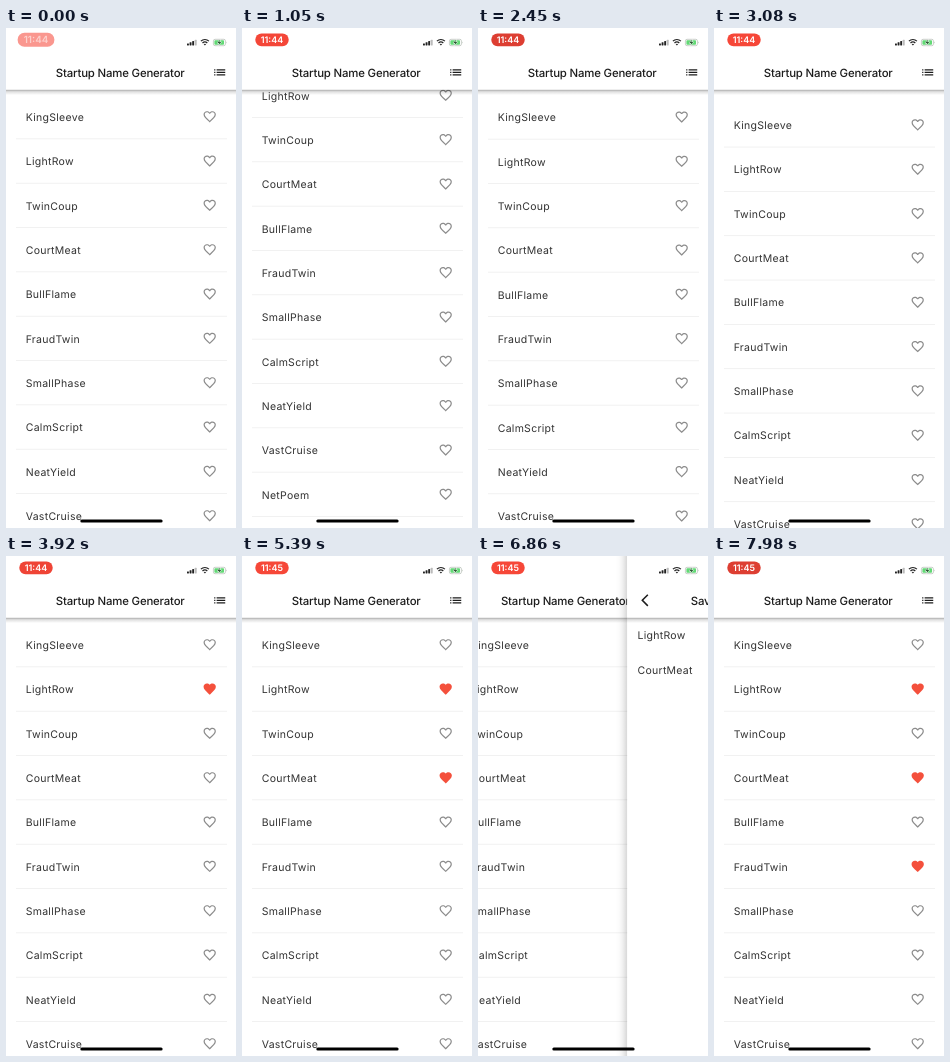
Write an HTML page that moves like this. It is 230 px wide and 500 px high and loops after 8 s.

```html
<!DOCTYPE html>
<html lang="en">
<head>
<meta charset="utf-8">
<title>Startup Name Generator</title>
<style>
  html, body { margin: 0; width: 100%; height: 100%; overflow: hidden; background: #fff; }
  svg { display: block; width: 230px; height: 500px; font-family: Inter, "Liberation Sans", sans-serif; }
  text { text-rendering: geometricPrecision; }
  .row { font-size: 10.5px; letter-spacing: .28px; fill: #333; }
  .title { font-size: 11.4px; font-weight: 500; letter-spacing: -.18px; fill: #1c1c1c; text-anchor: middle; }
  .clock { font-size: 9px; font-weight: 600; fill: #fff; text-anchor: middle; }
</style>
</head>
<body>
<svg id="stage" viewBox="0 0 230 500">
  <defs>
    <linearGradient id="barShadow" x2="0" y2="1">
      <stop offset="0" stop-opacity=".36"/>
      <stop offset=".4" stop-opacity=".12"/>
      <stop offset="1" stop-opacity="0"/>
    </linearGradient>
    <linearGradient id="edgeShadow">
      <stop offset="0" stop-opacity="0"/>
      <stop offset=".3" stop-opacity=".016"/>
      <stop offset=".6" stop-opacity=".06"/>
      <stop offset="1" stop-opacity=".16"/>
    </linearGradient>
  </defs>
  <g id="home">
    <rect width="230" height="500" fill="#fff"/>
    <rect id="press" x="10" width="211" height="34.5"/>
    <g id="list"></g>
  </g>
  <g id="saved">
    <rect x="-11.5" width="11.5" height="500" fill="url(#edgeShadow)"/>
    <rect width="230" height="500" fill="#fff"/>
  </g>
  <g id="status">
    <g id="pill">
      <rect id="pillShape" x="13.3" y="5.4" width="33.4" height="12.8" rx="6.2"/>
      <text id="clock" class="clock" x="30" y="15"></text>
    </g>
    <g id="signal"></g>
    <g fill="none" stroke="#222" stroke-width="1.2">
      <path d="M194.9 13.2a5.6 5.6 0 0 1 8 0M196.5 15a3.4 3.4 0 0 1 4.8 0"/>
      <path d="M198.9 17.6l-1.2-1.4a1.8 1.8 0 0 1 2.4 0z" fill="#222" stroke="none"/>
    </g>
    <rect x="207.4" y="11.3" width="12" height="6.4" rx="1.6" fill="none" stroke="#b4bcb4" stroke-width=".7"/>
    <rect x="208.4" y="12.3" width="9.6" height="4.4" rx=".8" fill="#62d975"/>
    <path d="M220.2 13.5q1.2 1 0 2z" fill="#b4bcb4"/>
    <path d="M214.2 11.6l-3 3.3h1.9l-.8 2.6 3-3.5h-1.9z" fill="#2c5a34" stroke="#fff" stroke-width="1" paint-order="stroke"/>
  </g>
  <rect x="74.3" y="491.4" width="82.3" height="3" rx="1.5"/>
</svg>
<script>
const LOOP = 8000, STEP = 70;
const DP = 500 / 812;          // pixels per layout unit
const PITCH = 72 * DP, FIRST = 144 * DP;
const WIDTH = 230, BAR_BOTTOM = 100 * DP;

const names = ['KingSleeve', 'LightRow', 'TwinCoup', 'CourtMeat', 'BullFlame', 'FraudTwin',
  'SmallPhase', 'CalmScript', 'NeatYield', 'VastCruise', 'NetPoem', 'FastNorm', 'OldGhost'];
const likedAt = { LightRow: 3850, CourtMeat: 4410, FraudTwin: 7700 };

const HEART = 'M12 21.35l-1.45-1.32C5.4 15.36 2 12.28 2 8.5 2 5.42 4.42 3 7.5 3c1.74 0 3.41.81 4.5 2.09' +
  'C13.09 3.81 14.76 3 16.5 3 19.58 3 22 5.42 22 8.5c0 3.78-3.4 6.86-8.55 11.54z';
const HEART_HOLE = 'M12.1 18.55l-.1.1-.1-.1C7.14 14.24 4 11.39 4 8.5 4 6.5 5.5 5 7.5 5c1.54 0 3.04.99 3.57 2.36' +
  'h1.87C13.46 5.99 14.96 5 16.5 5c2 0 3.5 1.5 3.5 3.5 0 2.89-3.14 5.74-7.9 10.05z';
const LIST = 'M3 7h2v2H3zM3 11h2v2H3zM3 15h2v2H3zM7 7h14v2H7zM7 11h14v2H7zM7 15h14v2H7z';
const BACK = 'M17.51 3.87L15.73 2.1 5.84 12l9.9 9.9 1.77-1.77L9.38 12z';

const $ = id => document.getElementById(id);

function add(parent, tag, attrs, text) {
  const node = document.createElementNS('http://www.w3.org/2000/svg', tag);
  for (const key in attrs) node.setAttribute(key, attrs[key]);
  if (text) node.textContent = text;
  parent.append(node);
  return node;
}

// Places a 24-unit icon around a centre point.
function addIcon(parent, d, cx, cy, fill) {
  return add(parent, 'path', {
    d, fill, 'fill-rule': 'evenodd',
    transform: `translate(${cx - 12 * DP} ${cy - 12 * DP}) scale(${DP})`
  });
}

function addBar(page, title, icon, iconX) {
  add(page, 'rect', { y: BAR_BOTTOM, width: WIDTH, height: 5.5, fill: 'url(#barShadow)' });
  add(page, 'rect', { width: WIDTH, height: BAR_BOTTOM, fill: '#fff' });
  add(page, 'text', { class: 'title', x: 114.2, y: 48.6 }, title);
  addIcon(page, icon, iconX, 72 * DP, '#1c1c1c');
}

const hearts = names.map((name, i) => {
  const y = FIRST + i * PITCH;
  add($('list'), 'text', { class: 'row', x: 19.7, y: y + 4.2 }, name);
  add($('list'), 'rect', { x: 10, y: y + PITCH / 2 - .35, width: 211, height: .7, fill: '#ebebeb' });
  return addIcon($('list'), HEART + HEART_HOLE, 203.7, y, '#8c8c8c');
});
addBar($('home'), 'Startup Name Generator', LIST, 213.7);

['LightRow', 'CourtMeat'].forEach((name, i) =>
  add($('saved'), 'text', { class: 'row', x: 10.2, y: (128 + 56 * i) * DP + 4.2 }, name));
addBar($('saved'), 'Saved Suggestions', BACK, 17.7);

for (let i = 0; i < 4; i++) {
  const h = 2 + i * 1.2;
  add($('signal'), 'rect', {
    x: 181 + i * 2.6, y: 17.4 - h, width: 1.9, height: h, rx: .4, fill: i < 3 ? '#222' : '#bbb'
  });
}

const clamp = x => Math.min(1, Math.max(0, x));

// Cubic ease (.4, 0, .2, 1), solved by bisection.
function ease(x) {
  let lo = 0, hi = 1;
  for (let i = 0; i < 24; i++) {
    const s = (lo + hi) / 2, r = 1 - s;
    if (1.2 * s * r * r + .6 * s * s * r + s * s * s < x) lo = s; else hi = s;
  }
  return lo * lo * (3 - 2 * lo);
}

const progress = (t, start, length) => {
  const x = clamp((t - start) / length);
  return x === 0 || x === 1 ? x : ease(x);
};

// Time, list offset, velocity.
const scrollKnots = [
  [770, 0, 0], [1100, -80, -.26], [1610, -129, 0], [1920, -82, .26],
  [2450, .3, .1], [2700, 16, 0], [3080, 8.2, -.03], [3710, 0, 0]
];

function scrollAt(t) {
  const i = scrollKnots.findIndex(k => k[0] > t);
  if (i < 1) return 0;
  const [t0, y0, v0] = scrollKnots[i - 1], [t1, y1, v1] = scrollKnots[i];
  const d = t1 - t0, s = (t - t0) / d, r = 1 - s;
  return y0 * (1 + 2 * s) * r * r + v0 * d * s * r * r + y1 * s * s * (3 - 2 * s) - v1 * d * s * s * r;
}

function drawPill(t) {
  const intro = clamp(t / 700);
  const scale = 1.1 - .1 * intro;
  const dim = Math.max(0, Math.cos((t - 2450) / 1843 * 2 * Math.PI)) * (t > 700 ? 1 : 0);
  $('pill').setAttribute('transform', `translate(30 11.7) scale(${scale}) translate(-30 -11.7)`);
  $('pillShape').setAttribute('fill', `rgb(${246 - 25 * dim},${71 - 9 * dim},${56 - 6 * dim})`);
  $('pillShape').setAttribute('opacity', .56 + .44 * intro);
  $('clock').setAttribute('opacity', .55 + .45 * intro);
  $('clock').textContent = t < 4830 ? '11:44' : '11:45';
}

function draw(t) {
  $('list').setAttribute('transform', `translate(0 ${scrollAt(t)})`);

  hearts.forEach((heart, i) => {
    const liked = t >= likedAt[names[i]];
    heart.setAttribute('d', liked ? HEART : HEART + HEART_HOLE);
    heart.setAttribute('fill', liked ? '#f4503c' : '#8c8c8c');
  });

  const press = clamp((t - 4270) / 140) * clamp((4900 - t) / 300);
  $('press').setAttribute('y', FIRST + 3 * PITCH - 17.25);
  $('press').setAttribute('opacity', .07 * press);

  const open = progress(t, 5400, 450) - progress(t, 6722, 330);
  $('home').setAttribute('transform', `translate(${-open * WIDTH / 3} 0)`);
  $('saved').setAttribute('transform', `translate(${(1 - open) * WIDTH} 0)`);
  $('saved').setAttribute('visibility', open > 0 ? 'visible' : 'hidden');

  drawPill(t);
}

const begin = performance.now();
function tick() {
  const t = (performance.now() - begin) % LOOP;
  draw(Math.floor(t / STEP) * STEP);
  requestAnimationFrame(tick);
}
tick();
</script>
</body>
</html>
```
